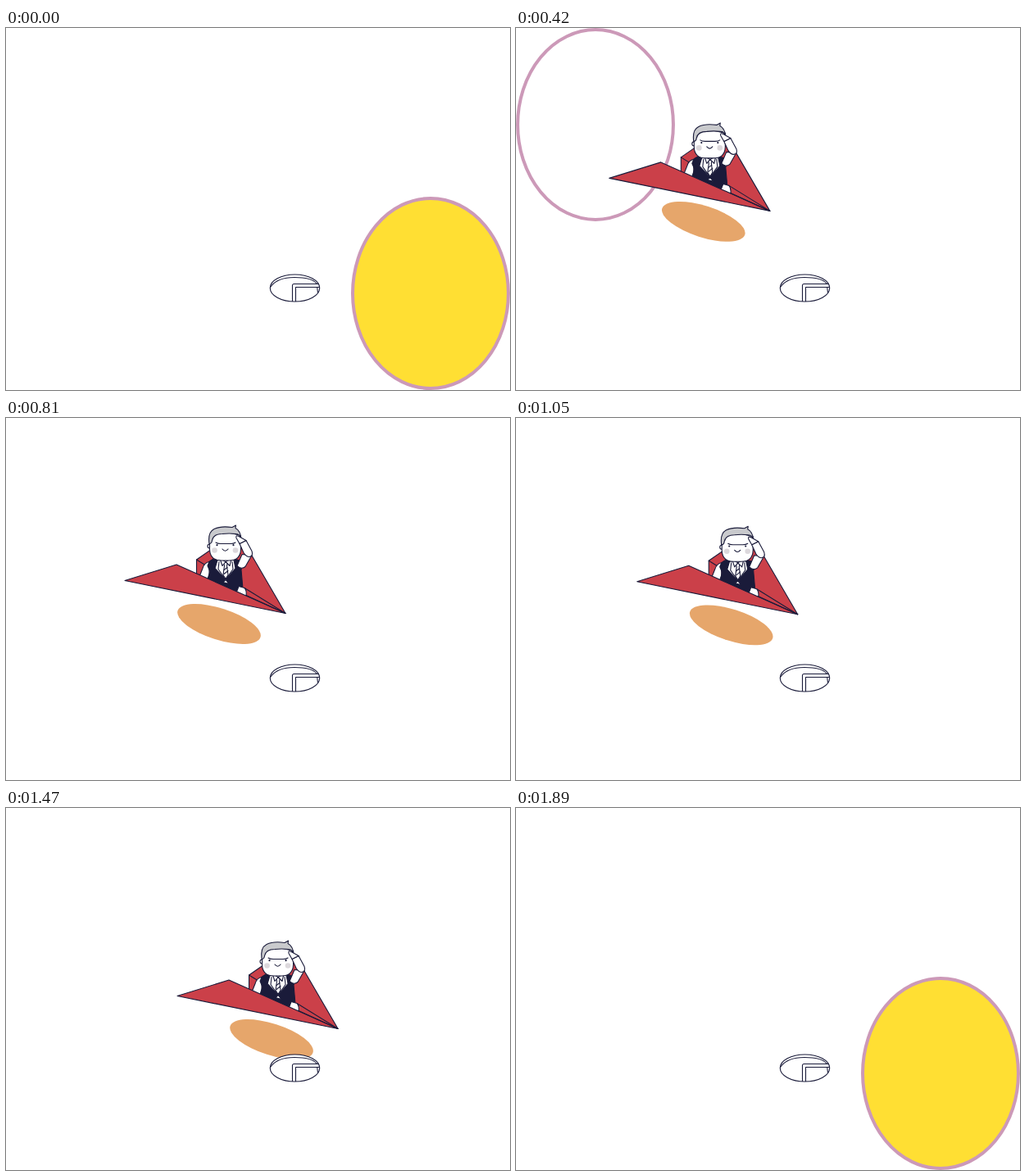
Animation, 615 px wide and 442 px high, one loop 1.92 s. Source, as an HTML page:

```html
<!DOCTYPE html>
<html lang="en">
<head>
<meta charset="utf-8">
<title>Paper plane through portals</title>
<style>
  html, body { margin: 0; width: 100%; height: 100%; overflow: hidden; background: #fff; }
  svg { display: block; width: 615px; height: 442px; }
  .line { stroke: #1a1b3a; stroke-width: 1.1; stroke-linejoin: round; stroke-linecap: round; }
  .bare { stroke: none; }
  .none { fill: none; }
  .red { fill: #cb4049; }
  .white { fill: #fff; }
  .navy { fill: #1a1b3a; }
  .portal { stroke: #cc99b8; stroke-width: 4; }
</style>
</head>
<body>
<svg viewBox="0 0 615 442">
  <defs>
    <clipPath id="flight">
      <ellipse id="mouth" cx="97" cy="118"/>
      <rect x="97" y="0" width="421" height="442"/>
    </clipPath>
    <clipPath id="floor"><path d="M56 269L302 156L527 263L280 379z"/></clipPath>
    <clipPath id="rim"><ellipse cx="352.5" cy="317.5" rx="30.5" ry="16.5"/></clipPath>
  </defs>

  <g clip-path="url(#floor)">
    <g id="shadow">
      <ellipse rx="53" ry="19.2" transform="translate(166 206) rotate(17.8)" fill="#e6a66b"/>
    </g>
  </g>

  <g class="line none">
    <ellipse class="white bare" cx="352.5" cy="317.5" rx="30.2" ry="16.5"/>
    <g clip-path="url(#rim)">
      <path d="M323 316Q331 304.5 352 304.5Q373 304.500 379 312L380.5 323"/>
      <path class="white" d="M349.5 336V314.5Q349.5 312.5 351.5 312.5H384V316.5H353.5V336"/>
    </g>
    <ellipse cx="352.5" cy="317.5" rx="30.2" ry="16.5"/>
  </g>

  <ellipse id="entry" class="portal white" cx="97" cy="118"/>

  <g id="sky" clip-path="url(#flight)">
    <g id="plane" class="line">
      <!-- far wing -->
      <path class="red" d="M138.5 127.5L168 107L197 107L247 193L138.5 146z"/>
      <path class="none" d="M138.5 127.5L149 134L165 122M197 162L247 193"/>

      <!-- body -->
      <path class="white" d="M154 130Q148 131 146 138L142 148L154 153z"/>
      <path class="navy" d="M154 130Q157 127 162 127H186Q193 128 195 132L193 140L195 163L190 162L186 166L152 151L155 142L152 135z"/>
      <path class="white" d="M190 160L197 162Q200 165 199 172L187 168z"/>
      <path class="white" d="M164 128H184L186 138L174 152L161 138z"/>
      <path class="none" d="M166 130L165 139L174 152L183 139L182 130"/>
      <path class="white" d="M171.500 131H176.500L175.500 135L177 146L174 151L171 146L172.500 135z"/>
      <path class="none" d="M172 140L176 137M172 145L177 141"/>
      <path class="white" d="M174 152L178 157L171 155z"/>
      <path class="white" d="M167 126L174 130L170 135zM181 126L174 130L179 135z"/>

      <!-- head -->
      <circle class="white" cx="154.5" cy="111" r="2.5"/>
      <path class="white" d="M154.5 104V115Q155 128.5 169 128.5H178Q192 128.5 192.5 115V98L176 94L157 97z"/>
      <path fill="#c9cacd" d="M154 108Q152 94 160 90Q168 86 182 88L186.5 85.5L186 89Q192 92 193 102Q191 96 187 96Q178 95 170 96Q159 96 157.5 104Q157 108 154 108z"/>
      <path class="none" d="M162 106.5Q164 108 168 108H180Q184 108 186 106.5M170 114.5Q173.5 119 177 114.5"/>
      <g class="bare">
        <circle class="navy" cx="163.5" cy="109.7" r="1.1"/>
        <circle class="navy" cx="183.5" cy="109.7" r="1.1"/>
        <circle fill="#dcd8dc" cx="160.5" cy="116" r="3.3"/>
        <circle fill="#dcd8dc" cx="186" cy="116" r="3.3"/>
      </g>

      <!-- saluting arm -->
      <path class="white" d="M194 121L188 135Q193 140 198 136L206 122z"/>
      <path class="white" d="M191 108L199 104L206 117Q208 123 203 124Q199 124 196 119z"/>
      <path class="white" d="M191 108L187 101Q186 97 190 99L199 104z"/>

      <!-- near wing -->
      <path class="red" d="M51 153L114 133.5L247 193z"/>
      <path class="none" d="M199 171L247 193"/>
    </g>
  </g>

  <ellipse id="exit" class="portal" fill="#ffdf33" cx="518" cy="324"/>
</svg>

<script>
  const LOOP = 1920, STEP = 30;
  const OPEN = 350, CLOSE = 367;
  const $ = id => document.getElementById(id);
  const clamp = p => Math.min(1, Math.max(0, p));

  const opening = (t, start) => 1 - (1 - clamp((t - start) / OPEN)) ** 3;
  const closing = (t, start) => 1 - clamp((t - start) / CLOSE) ** 3;

  function resize(el, s) {
    el.setAttribute("rx", 95 * s);
    el.setAttribute("ry", 116 * s);
  }

  // Fast in, a near pause at mid-flight, fast out.
  function flight(t) {
    const u = t - 825;
    return 94 + (u < 0 ? 94 * (u / 585) ** 3 : 134 * (u / 825) ** 3);
  }

  function draw(t) {
    const entry = t < 390 ? opening(t, 30) : closing(t, 390);
    const exit = t < 900 ? closing(t, 0) : opening(t, 1555);
    resize($("entry"), entry);
    resize($("mouth"), entry);
    resize($("exit"), exit);

    const x = flight(t);
    const move = `translate(${x} ${x * 0.484})`;
    $("plane").setAttribute("transform", move);
    $("shadow").setAttribute("transform", move);
    $("sky").style.display = t > 30 ? "" : "none";
  }

  const begin = performance.now();
  function tick() {
    const t = (performance.now() - begin) % LOOP;
    draw(Math.floor(t / STEP) * STEP);
    requestAnimationFrame(tick);
  }
  draw(0);
  requestAnimationFrame(tick);
</script>
</body>
</html>
```
